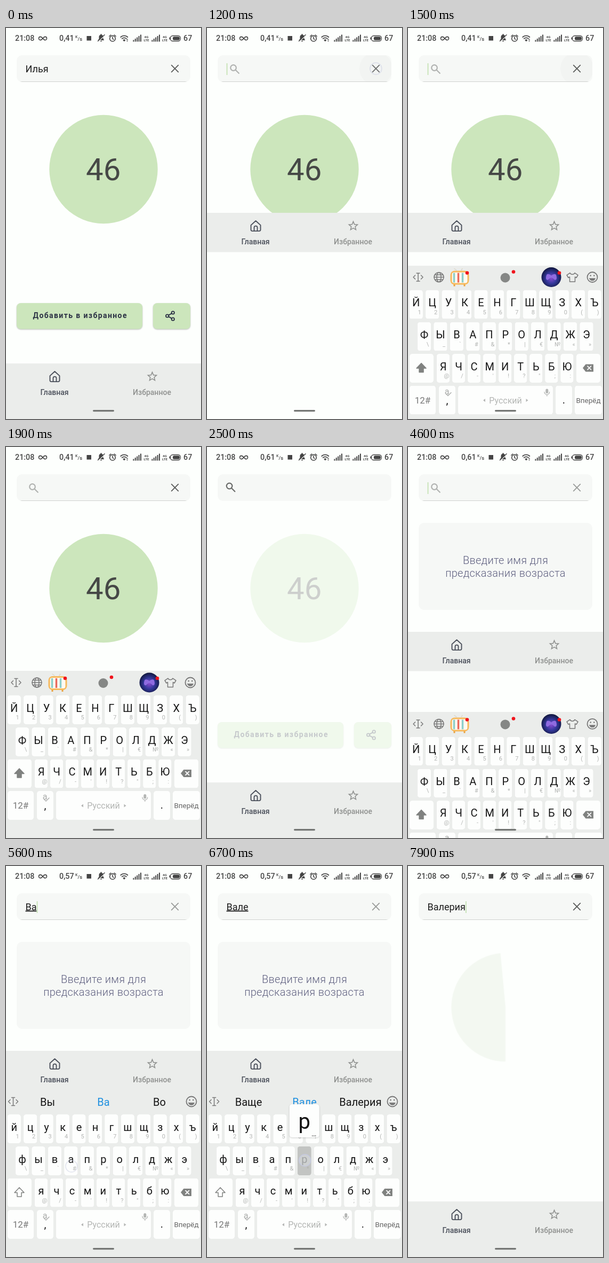
Animation of 366 by 732 pixels, one loop 8 s. Source, as an HTML page:

```html
<!DOCTYPE html>
<html lang="ru">
<head>
<meta charset="utf-8">
<title>Возраст по имени</title>
<style>
html, body { margin: 0; width: 100%; height: 100%; overflow: hidden; background: #fdfffd; }
svg { display: block; }
text { font-family: Roboto, "Noto Sans", sans-serif; white-space: pre; }
.mid { text-anchor: middle; }
.line { fill: none; stroke-linecap: round; stroke-linejoin: round; }
.status text { font-weight: 500; font-size: 14.3px; fill: #444; }
.status .tiny { font-size: 6.2px; font-weight: 700; }
.btn { fill: #cce6bc; filter: drop-shadow(0 1.5px 1.2px rgba(0, 0, 0, .27)); }
.nav text { font-size: 14px; font-weight: 500; text-anchor: middle; }
.card rect { height: 445px; }
.card text { font-size: 20px; font-weight: 300; letter-spacing: .3px; fill: #5f6080; text-anchor: middle; }
.below { fill: #ebedeb; }
.open .below { fill: #fdfffd; }
.open .nav { transform: translateY(346px); }
.nav { transform: translateY(628px); }
.open .card rect { height: 163px; }
.open .card g { transform: translateY(-141px); }
.key { fill: #fdfefd; filter: drop-shadow(0 .7px .5px rgba(0, 0, 0, .13)); }
.letter { font-size: 20px; fill: #161616; text-anchor: middle; }
.hint { font-size: 11px; fill: #b2b4b2; text-anchor: middle; }
.tip { font-size: 20px; fill: #161616; text-anchor: middle; }
.down .key { fill: #c2c4c2; }
.down .letter { fill: #858785; }

.board { animation: board 8s infinite; }
.result { animation: result 8s linear infinite; }
.card { animation: card 8s linear infinite; }
.ripple { animation: ripple 8s linear infinite; }
.pie { animation: pie 8s linear infinite; }
@keyframes board {
  0%, 15.19% { transform: translateY(313px); animation-timing-function: cubic-bezier(.333, .667, .667, 1); }
  20.19%, 23.75% { transform: none; animation-timing-function: cubic-bezier(.4, 0, 1, 1); }
  27%, 55% { transform: translateY(313px); animation-timing-function: cubic-bezier(.333, .667, .667, 1); }
  60%, 95.2% { transform: none; animation-timing-function: cubic-bezier(.4, 0, 1, 1); }
  98.3%, 100% { transform: translateY(313px); }
}
@keyframes result {
  0%, 28.3% { opacity: 1; }
  32.3%, 100% { opacity: 0; }
}
@keyframes card {
  0%, 37% { opacity: 0; }
  41.25%, 95.5% { opacity: 1; }
  96.8%, 100% { opacity: 0; }
}
@keyframes ripple {
  0%, 12.5% { opacity: 0; transform: scale(.3); }
  15%, 18.75% { opacity: 1; transform: none; }
  22.5%, 100% { opacity: 0; transform: none; }
}
@keyframes pie {
  0%, 96.4% { stroke-dasharray: 0 100; opacity: 0; }
  96.5% { stroke-dasharray: 0 100; opacity: 1; }
  98.75%, 100% { stroke-dasharray: 48.5 100; opacity: 1; }
}
</style>
</head>
<body>
<svg id="stage" width="366" height="732" viewBox="0 0 366 732">
  <defs>
    <radialGradient id="space" cx=".5" cy=".55" r=".55">
      <stop offset="0" stop-color="#8a4cd0"/><stop offset=".5" stop-color="#34389c"/><stop offset="1" stop-color="#10163c"/>
    </radialGradient>
    <clipPath id="boxClip"><rect x="20" y="51" width="326" height="50" rx="10"/></clipPath>
    <g id="bars" fill="#444">
      <rect x="0" y="10" width="2" height="3"/><rect x="3.4" y="7.5" width="2" height="5.5"/>
      <rect x="6.8" y="5" width="2" height="8"/><rect x="10.2" y="2.5" width="2" height="10.5"/>
      <rect x="13.6" y="0" width="2" height="13"/>
    </g>
  </defs>
  <rect width="366" height="732" fill="#fdfffd"/>

  <g class="status">
    <text x="17" y="24">21:08</text>
    <path class="line" stroke="#444" stroke-width="1.6" d="M69 19.5C67 17 66 16.4 64.6 16.4a3.1 3.1 0 0 0 0 6.2C66 22.6 67 22 69 19.5S72 16.4 73.4 16.4a3.1 3.1 0 0 1 0 6.2C72 22.6 71 22 69 19.5"/>
    <text id="speed" x="100" y="24"></text>
    <text x="130" y="18.5" style="font-size:7px">K</text>
    <text x="134.5" y="24" style="font-size:9.5px">/s</text>
    <rect x="151.5" y="15" width="8.5" height="8.5" fill="#444"/>
    <path fill="#444" d="M173 23v-1l1.5-1.5v-3.8a4 4 0 0 1 3-4v-.6a1 1 0 0 1 2 0v.6a4 4 0 0 1 3 4v3.8l1.5 1.5v1zM177 24h3a1.5 1.5 0 0 1-3 0z"/>
    <path class="line" stroke="#fdfffd" stroke-width="1.5" d="M173 25.5L186 13.5"/>
    <path class="line" stroke="#444" stroke-width="1.5" d="M172.5 24.5L185 12.8"/>
    <g class="line" stroke="#444" stroke-width="1.6">
      <circle cx="200" cy="19.7" r="5.3"/><path d="M200 16.7v3.3l2 1.3M193.8 15.5l3-2.5M206.2 15.5l-3-2.5"/>
    </g>
    <path class="line" stroke="#444" stroke-width="1.8" d="M215.3 17a9.3 9.3 0 0 1 13 0M217.7 19.9a6 6 0 0 1 8.2 0"/>
    <path fill="#444" d="M221.8 25.5l-2.5-3a3.6 3.6 0 0 1 5 0z"/>
    <path id="traffic" fill="#444" d="M226 22l1.6-2 1.6 2zM226 23.5l1.6 2 1.6-2z"/>
    <use href="#bars" x="238.4" y="12.5"/><use href="#bars" x="273.4" y="12.5"/>
    <text class="tiny mid" x="263.5" y="18.5">4G</text><text class="tiny mid" x="263.5" y="25">LTE</text>
    <text class="tiny mid" x="298" y="18.5">4G</text><text class="tiny mid" x="298" y="25">LTE</text>
    <rect x="308.5" y="14.5" width="19" height="10" rx="4.5" fill="none" stroke="#444" stroke-width="1.3"/>
    <rect x="313" y="16.3" width="13" height="6.4" rx="2.5" fill="#444"/><rect x="306.5" y="17.5" width="1.5" height="4" fill="#444"/>
    <text x="333" y="24">67</text>
  </g>

  <rect x="20" y="51" width="326" height="50" rx="10" fill="#f6f8f6"/>
  <g clip-path="url(#boxClip)">
    <circle class="ripple" cx="317" cy="76" r="31" fill="#f2f4f2" style="transform-origin:317px 76px"/>
    <rect id="rule" x="20" y="100" width="326" height="1.2" fill="#cfd1cf"/>
  </g>
  <g id="lens" class="line" stroke-width="2.2"><circle cx="42" cy="73" r="5.3"/><path d="M46.3 77.3l6 6"/></g>
  <text id="field" x="36.5" y="82.5" font-size="18" fill="#1c1c1c"></text>
  <rect id="caret" y="66" width="1.8" height="22" fill="#c5e2b4"/>
  <path id="cross" class="line" stroke-width="1.9" d="M310.7 69.7l12.6 12.6M323.3 69.7l-12.6 12.6"/>

  <g class="card">
    <rect x="20" y="142" width="326" rx="10" fill="#f6f8f6"/>
    <g><text x="183" y="359.5">Введите имя для</text><text x="183" y="383.5">предсказания возраста</text></g>
  </g>
  <circle class="pie" cx="183" cy="264.5" r="50.85" fill="none" stroke="#f3f8f1" stroke-width="101.7" pathLength="100" transform="rotate(90 183 264.5)"/>
  <g class="result">
    <circle cx="183" cy="264.5" r="101.7" fill="#cce6bc"/>
    <text class="mid" x="182.7" y="284.5" font-size="58" fill="#464846">46</text>
    <rect class="btn" x="20" y="515" width="236" height="48.5" rx="8"/>
    <rect class="btn" x="276" y="515" width="70" height="48.5" rx="8"/>
    <text class="mid" x="139.2" y="543" font-size="14" font-weight="700" letter-spacing="1.4" fill="#2b3144">Добавить в избранное</text>
    <g class="line" stroke="#2b3144" stroke-width="1.8">
      <circle cx="313.3" cy="533" r="2.7"/><circle cx="302.7" cy="539" r="2.7"/><circle cx="313.3" cy="545" r="2.7"/>
      <path d="M305.2 537.6l5.7-3.2M305.2 540.4l5.7 3.2"/>
    </g>
  </g>

  <g class="nav">
    <rect class="below" y="73" width="366" height="313"/>
    <rect width="366" height="73.5" fill="#ebedeb"/>
    <path class="line" stroke="#4a4f5a" stroke-width="1.9" d="M82.5 23.1L91.5 15l9 8.1v8.5a2.5 2.5 0 0 1-2.5 2.5h-13a2.5 2.5 0 0 1-2.5-2.500zM88.500 33.600v-6a3 3 0 0 1 6 0v6"/>
    <text x="91" y="58.5" fill="#4a4f5a">Главная</text>
    <path fill="#8f918f" transform="translate(262.5 12.3)" d="M22 9.24l-7.19-.62L12 2 9.19 8.63 2 9.24l5.46 4.73L5.82 21 12 17.27 18.18 21l-1.63-7.03zM12 15.4l-3.76 2.27 1-4.28-3.32-2.88 4.38-.38L12 6.1l1.71 4.04 4.38.38-3.32 2.88 1 4.28z"/>
    <text x="274" y="58.5" fill="#8f918f">Избранное</text>
  </g>

  <g class="board">
    <rect y="419" width="366" height="313" fill="#ebedeb"/>
    <path id="move" class="line" stroke="#777" stroke-width="1.5" d="M16 433.5h6M19 433.5v15M16 448.5h6M13.5 437.5l-3.5 3.5 3.5 3.5M24.5 437.5l3.5 3.5-3.5 3.5"/>
    <g id="smile" class="line" stroke="#777" stroke-width="1.8">
      <circle cx="346" cy="441" r="9.5"/><path fill="#777" stroke-width=".6" d="M340.5 443.2h11a5.6 5.2 0 0 1-11 0z"/>
      <path stroke-width="2.6" d="M342.7 438v.1M349.3 438v.1"/>
    </g>
    <g id="tools">
      <g class="line" stroke="#777" stroke-width="1.5">
        <circle cx="58" cy="441" r="9"/><ellipse cx="58" cy="441" rx="4" ry="9"/><path d="M49 441h18M50.5 436.5h15M50.5 445.5h15"/>
        <path d="M304 433l-6 4 3 5 2.500-1.500v9h10v-9l2.500 1.500 3-5-6-4a5 5 0 0 1-9 0z"/>
      </g>
      <path class="line" stroke="#dcd8cc" stroke-width="1.5" d="M91 428l-4-3M100 428l2-3"/>
      <path stroke="#e9a13c" stroke-width="3" d="M87 454v4M106 454v4"/>
      <rect x="79.500" y="429" width="35" height="26" rx="8" fill="#f6b95c"/>
      <rect x="82.500" y="432" width="29" height="20" rx="4" fill="#fffaf2"/>
      <path stroke-width="3.500" stroke="#8ccfca" d="M86.500 433v18M102.500 433v18"/><path stroke-width="3.500" stroke="#e8695c" d="M94.500 433v18"/>
      <circle cx="182.5" cy="442" r="9" fill="#858785"/>
      <circle cx="269" cy="441" r="18.5" fill="url(#space)"/>
      <path fill="#8f6be0" d="M269 438c-3-3-8-4-9-1s-2 8 1 9 4-4 8-4 5 5 8 4 2-6 1-9-6-2-9 1z"/>
      <g fill="#f0141c"><circle cx="111" cy="433" r="3.3"/><circle cx="198" cy="431" r="3.3"/><circle cx="284" cy="433" r="3.3"/></g>
    </g>
    <g id="tips"><text class="tip" x="78" y="448.5"></text><text class="tip" x="183" y="448.5" style="fill:#1f90e0"></text><text class="tip" x="288" y="448.5"></text></g>
    <g id="keys"></g>
    <path id="shift" class="line" stroke="#808280" stroke-width="1.5" d="M25 602l-9 9.5h5v7.5h8v-7.5h5z"/>
    <path fill="#808280" d="M328 611l5.5-7h14.5v14h-14.5z"/>
    <path class="line" stroke="#fff" stroke-width="1.7" d="M337 607.7l6.5 6.5M343.5 607.7l-6.5 6.5"/>
    <text class="mid" x="27.5" y="677" font-size="17" fill="#777">12#</text>
    <text class="mid" x="73" y="660" font-size="16" fill="#a9aba9">а</text>
    <path class="line" stroke="#a9aba9" stroke-width="1.3" d="M72 660l3 3 6-6"/>
    <text class="mid" x="73.5" y="678" font-size="20" fill="#161616">,</text>
    <text class="mid" x="183" y="677" font-size="16" fill="#b4b6b4">Русский</text>
    <path fill="#b4b6b4" d="M145 668.5v6l-4-3zM221.5 668.5v6l4-3z"/>
    <rect x="258.3" y="650" width="5" height="8.5" rx="2.5" fill="#b4b6b4"/>
    <path class="line" stroke="#b4b6b4" stroke-width="1.3" d="M256 656a4.8 4.8 0 0 0 9.6 0M260.8 661v2.5"/>
    <text class="mid" x="292.5" y="677" font-size="20" fill="#161616">.</text>
    <text class="mid" x="338.5" y="676" font-size="13.5" fill="#666">Вперёд</text>
    <g id="popup">
      <rect x="-28" y="-79" width="56" height="62" rx="5" fill="#fdfefd" style="filter:drop-shadow(0 1px 1.5px rgba(0,0,0,.18))"/>
      <text class="mid" y="-33.5" font-size="40" fill="#111"></text>
      <text class="mid" x="18" y="-19" font-size="14" fill="#222">…</text>
    </g>
  </g>
  <circle id="touch" r="11" fill="#f4f6ff" fill-opacity=".25" stroke="#c6cae0" stroke-width="1.5"/>
  <rect x="163" y="715" width="40" height="3.2" rx="1.6" fill="#757775"/>
</svg>
<script>
const $ = id => document.getElementById(id);
const LOOP = 8000;

// [time, value] steps: each value holds until the next time
const words = [[0, 'Илья'], [1100, ''], [5300, 'В'], [5500, 'Ва'], [5800, 'Вал'], [6000, 'Вале'],
  [6800, 'Валер'], [7000, 'Валери'], [7200, 'Валерия']];
const tips = [[0, ',,'], [5300, 'Вы,В,Во'], [5500, 'Вы,Ва,Во'], [5800, 'Ваще,Вал,Валерия'], [6000, 'Ваще,Вале,Валерия'],
  [6800, 'Валера,Валер,Валерия'], [7000, 'Валерий,Валери,Валерия'], [7200, 'Валерии,Валерия,Валерию']];
const speeds = [[0, '0,41'], [2000, '0,61'], [5300, '0,57']];
const arrows = [[0, 1], [200, 0], [1000, 1], [3000, 0], [4200, 1], [5200, 0], [6100, 1], [6300, 0]];
const crosses = [[0, '#5c5e5c'], [2000, 'none'], [4300, '#9b9d9b'], [7600, '#5c5e5c']];
// each caret step holds the time its blinking restarts
const carets = [[0, null], [1100, 1100], [1950, null], [4300, 4300], [5300, 5300], [5500, 5500], [5800, 5800],
  [6000, 6000], [6800, 6800], [7000, 7000], [7200, 7200], [7600, 7600]];
const presses = [['в', 5190], ['а', 5390], ['л', 5690], ['е', 5890], ['р', 6690], ['и', 6890], ['я', 7090]];
const HOLD = 110;

const at = (steps, t) => steps.findLast(s => s[0] <= t)[1];
const within = (t, a, b) => t >= a && t < b;
const show = (el, on) => { el.style.visibility = on ? 'visible' : 'hidden'; };
const put = (el, s) => { if (el.textContent !== s) el.textContent = s; };

function add(parent, tag, attrs, text = '') {
  const el = document.createElementNS('http://www.w3.org/2000/svg', tag);
  for (const k in attrs) el.setAttribute(k, attrs[k]);
  el.textContent = text;
  return parent.appendChild(el);
}

const keys = {};
function plate(parent, x, y, w) {
  add(parent, 'rect', { class: 'key', x, y, width: w, height: 54, rx: 4.5 });
}
function row(letters, hints, x0, pitch, y, w) {
  [...letters].forEach((c, i) => {
    const x = x0 + i * pitch, g = add($('keys'), 'g', {});
    plate(g, x - w / 2, y, w);
    const letter = add(g, 'text', { class: 'letter', x, y: y + 30.5 }, c);
    add(g, 'text', { class: 'hint', x: x + 6.5, y: y + 45 }, hints[i]);
    keys[c] = { g, letter, x, y };
  });
}
row('йцукенгшщзхъ', '1234567890()', 15.2, 30.45, 465, 25.5);
row('фывапролджэ', '\\_`#&*|€№«»', 30.5, 30.45, 525, 25.5);
row('ячсмитьбю', '@/-\'!?";:', 66, 29.05, 584.5, 24.5);
for (const [x, y, w] of [[3, 584.5, 45], [316, 584.5, 45], [3, 644, 49], [58, 644, 31], [94, 644, 178], [277, 644, 31], [313, 644, 51]])
  plate($('keys'), x, y, w);

const touches = [[1000, 317, 76], [4200, 183, 76],
  ...presses.map(([c, t]) => [t, keys[c].x + 1, keys[c].y + (c === 'а' ? 37 : 26)]), [7570, 338, 671]];
const tipTexts = [...$('tips').children];
const [, popLetter] = $('popup').children;

function draw(t) {
  const word = at(words, t), focused = t < 1950 || t >= 4300;
  const typing = t >= 5300;

  $('stage').classList.toggle('open', within(t, 1200, 1900) || within(t, 4400, 7640));
  put($('speed'), at(speeds, t));
  show($('traffic'), at(arrows, t));

  put($('field'), word);
  $('field').style.textDecoration = within(t, 5300, 7600) ? 'underline' : 'none';
  show($('lens'), !word);
  $('lens').setAttribute('stroke', focused ? '#b0b2b0' : '#6a6c6a');
  $('lens').setAttribute('transform', focused ? 'translate(7.5 1.5)' : '');
  show($('rule'), focused);
  $('cross').setAttribute('stroke', at(crosses, t));
  const edit = at(carets, t);
  show($('caret'), edit !== null && (t - edit) % 1000 < 500);
  $('caret').setAttribute('x', 36.6 + (word ? $('field').getComputedTextLength() : 0));

  show($('tools'), !typing);
  show($('tips'), typing);
  at(tips, t).split(',').forEach((s, i) => put(tipTexts[i], s));
  $('move').setAttribute('transform', typing ? 'translate(-5.5 0)' : '');
  $('smile').setAttribute('transform', typing ? 'translate(2 0)' : '');
  $('shift').style.fill = typing ? 'none' : '#808280';

  for (const c in keys) {
    put(keys[c].letter, typing ? c : c.toUpperCase());
    keys[c].g.classList.toggle('down', presses.some(([k, s]) => k === c && within(t, s, s + HOLD)));
  }
  const held = presses.find(([, s]) => within(t, s, s + HOLD + 50));
  show($('popup'), held);
  if (held) {
    const { x, y } = keys[held[0]];
    $('popup').setAttribute('transform', `translate(${x} ${y})`);
    put(popLetter, typing ? held[0] : held[0].toUpperCase());
  }

  const touch = touches.findLast(([s]) => within(t, s, s + 300));
  show($('touch'), touch);
  if (touch) {
    const [s, x, y] = touch;
    $('touch').setAttribute('cx', x);
    $('touch').setAttribute('cy', y);
    $('touch').style.opacity = Math.min(1, 1 - (t - s - HOLD) / 190);
  }
}

let start;
function tick(now) {
  start ??= now;
  draw((now - start) % LOOP);
  requestAnimationFrame(tick);
}
draw(0);
requestAnimationFrame(tick);
</script>
</body>
</html>
```
